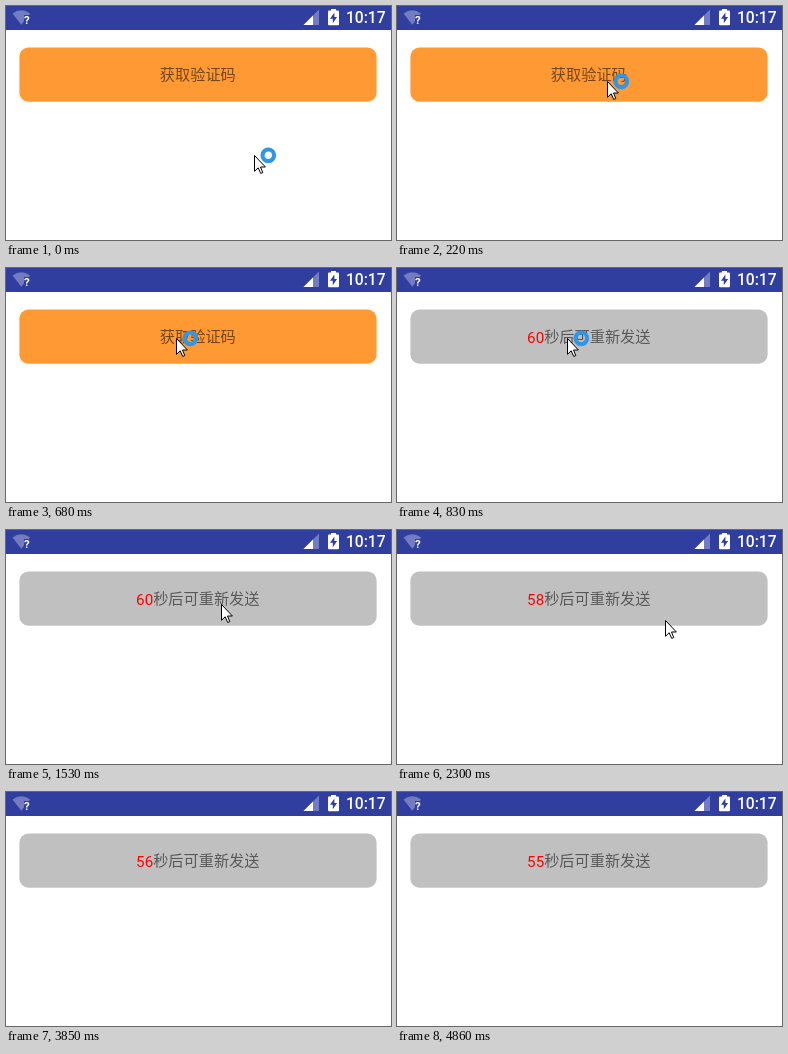
Write an HTML page with a canvas that moves like this. It is 385x234 px and loops after 5240 ms.

```html
<!DOCTYPE html>
<html lang="zh-CN">
<head>
<meta charset="utf-8">
<title>验证码倒计时</title>
<style>
html, body { margin: 0; width: 100%; height: 100%; overflow: hidden; background: #fff; }
canvas { display: block; }
</style>
</head>
<body>
<canvas id="stage" width="385" height="234" lang="zh-CN"></canvas>
<script>
const ctx = document.getElementById('stage').getContext('2d');
const LOOP = 5240;
const CLICK = 830;
const SECOND = 1005;
const TICK = 76.8; // the pointer moves in steps of this length
const BAR = '#303f9f';
const FADED = 'rgba(255,255,255,0.32)';
const LABEL_FONT = '15.2px Roboto, "Noto Sans CJK SC", "Noto Sans CJK", sans-serif';

const linear = p => p;
const easeIn = p => p * p;
const easeOut = p => p * (2 - p);
const easeInOut = p => p * p * (3 - 2 * p);

// Key points of the pointer tip, with the easing that leads to each
const PATH = [
  { tick: 0, x: 248, y: 149 },
  { tick: 5, x: 190, y: 35, ease: easeInOut },
  { tick: 6, x: 180, y: 46, ease: linear },
  { tick: 9, x: 170, y: 70, ease: easeOut },
  { tick: 17, x: 170, y: 70, ease: linear },
  { tick: 20, x: 215, y: 74, ease: linear },
  { tick: 24, x: 268, y: 86, ease: easeOut },
  { tick: 30, x: 268, y: 90, ease: easeOut },
  { tick: 35, x: 330, y: 260, ease: easeIn }
];
const RING_END = 18;

const arrow = new Path2D('M.5 .5V16.3L4.2 12.8L6.7 18.4L8.8 17.6L6.5 12H11.4Z');

function tipAt(tick) {
  const next = PATH.findIndex(key => key.tick > tick);
  if (next < 0) return PATH[PATH.length - 1];
  const a = PATH[next - 1], b = PATH[next];
  const p = b.ease((tick - a.tick) / (b.tick - a.tick));
  return { x: Math.round(a.x + (b.x - a.x) * p), y: Math.round(a.y + (b.y - a.y) * p) };
}

// The first step of the counter skips a number
function secondsLeft(t) {
  const passed = Math.floor((t - CLICK) / SECOND);
  return passed ? 59 - passed : 60;
}

function poly(color, ...points) {
  ctx.fillStyle = color;
  ctx.beginPath();
  points.forEach(([x, y]) => ctx.lineTo(x, y));
  ctx.fill();
}

function text(value, x, y, color, font) {
  ctx.font = font;
  ctx.fillStyle = color;
  ctx.fillText(value, x, y);
}

function statusBar() {
  ctx.fillStyle = BAR;
  ctx.fillRect(0, 0, 385, 24);

  // Wi-Fi
  ctx.fillStyle = FADED;
  ctx.beginPath();
  ctx.moveTo(15.3, 18.8);
  ctx.lineTo(6.5, 7.6);
  ctx.quadraticCurveTo(15.3, 0.8, 24.1, 7.6);
  ctx.fill();
  ctx.fillStyle = BAR;
  ctx.fillRect(18, 9, 7, 10);
  text('?', 18, 18.3, '#fff', 'bold 11.5px Roboto, sans-serif');

  // Signal
  poly(FADED, [297.5, 19], [313, 3.5], [313, 19]);
  poly('#fff', [297.5, 19], [307, 9.5], [307, 19]);

  // Battery
  ctx.fillStyle = '#fff';
  ctx.fillRect(325, 3, 5, 3);
  ctx.beginPath();
  ctx.roundRect(322, 4.5, 11, 14.7, 1);
  ctx.fill();
  poly(BAR, [328.4, 6.5], [324, 12.8], [326.8, 12.8], [326.8, 17.2], [331.1, 10.9], [328.4, 10.9]);

  text('10:17', 340, 17, '#fff', '500 15.6px Roboto, sans-serif');
}

function button(t) {
  const waiting = t >= CLICK;
  ctx.fillStyle = waiting ? '#c0c0c0' : '#ff9933';
  ctx.beginPath();
  ctx.roundRect(13.4, 41.6, 357.2, 54.1, 9);
  ctx.fill();

  const digits = waiting ? String(secondsLeft(t)) : '';
  const label = waiting ? '秒后可重新发送' : '获取验证码';
  ctx.font = LABEL_FONT;
  const digitWidth = ctx.measureText(digits).width;
  const left = 191.8 - (digitWidth + ctx.measureText(label).width) / 2;
  text(digits, left, 74.5, '#f00', LABEL_FONT);
  text(label, left + digitWidth, 74, 'rgba(0,0,0,0.54)', LABEL_FONT);
}

function pointer(t) {
  const tick = Math.floor((t + 15) / TICK);
  const tip = tipAt(tick);
  ctx.save();
  ctx.translate(tip.x, tip.y);
  ctx.fillStyle = '#fff';
  ctx.fill(arrow);
  ctx.strokeStyle = '#000';
  ctx.lineWidth = 1;
  ctx.lineJoin = 'round';
  ctx.stroke(arrow);
  if (tick < RING_END) {
    ctx.strokeStyle = '#2f96e8';
    ctx.lineWidth = 4.2;
    ctx.beginPath();
    ctx.arc(14.3, 0.3, 5.8, 0, Math.PI * 2);
    ctx.stroke();
  }
  ctx.restore();
}

function draw(t) {
  ctx.fillStyle = '#fff';
  ctx.fillRect(0, 0, 385, 234);
  statusBar();
  button(t);
  pointer(t);
}

const start = performance.now();
function frame() {
  draw((performance.now() - start) % LOOP);
  requestAnimationFrame(frame);
}
frame();
</script>
</body>
</html>
```
